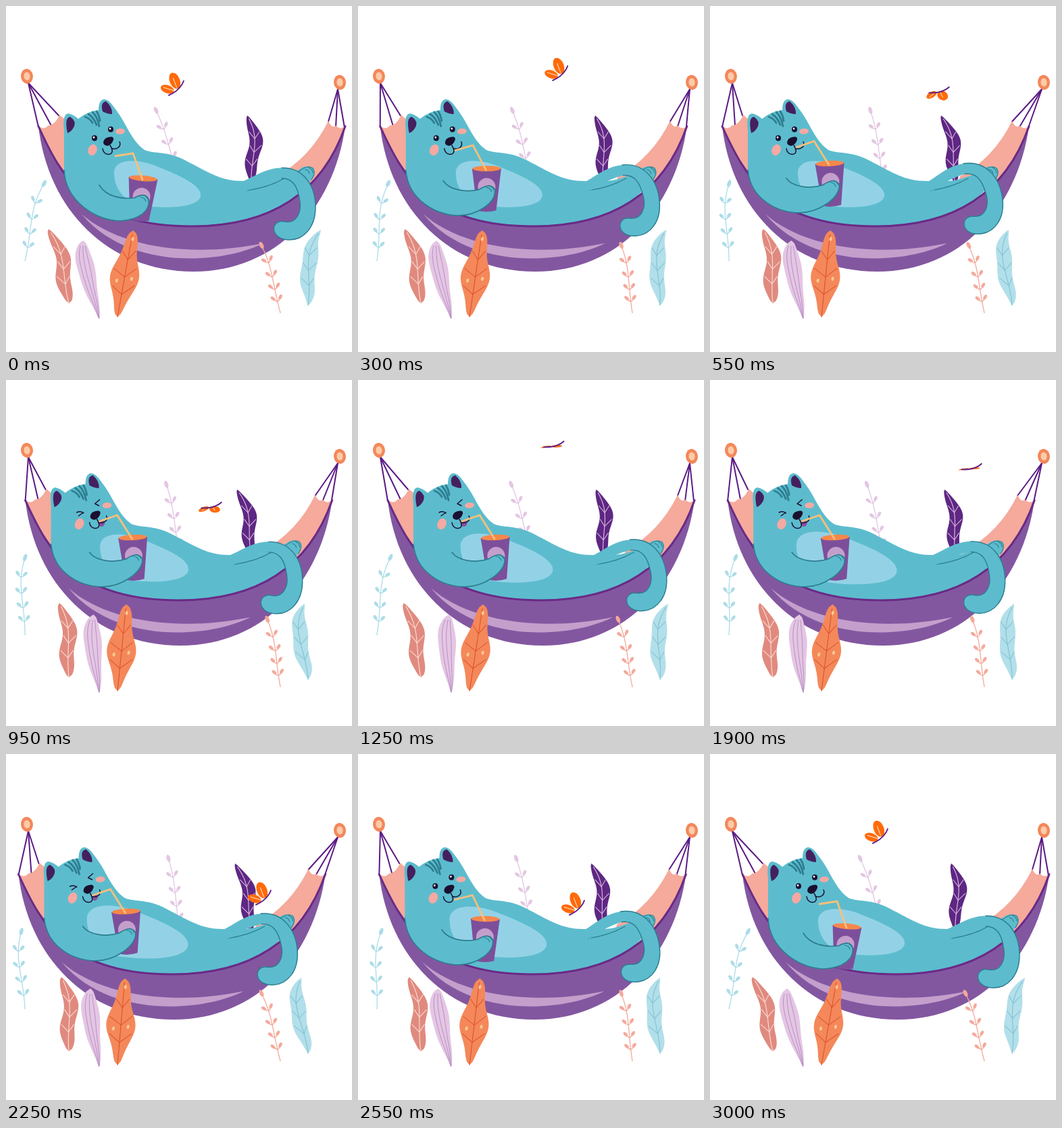
Recreate the animation shown at these times as an HTML page with a canvas. Size 512 by 512 pixels, loop 3050 ms.

```html
<!DOCTYPE html>
<html>
<head>
<meta charset="utf-8">
<style>
html, body { margin: 0; width: 100%; height: 100%; overflow: hidden; background: #fff; }
canvas { display: block; width: 512px; height: 512px; }
</style>
</head>
<body>
<canvas id="stage" width="512" height="512"></canvas>
<script>
const ctx = document.getElementById('stage').getContext('2d');
const LOOP = 3050, STEP = 50, TAU = Math.PI * 2;
const TEAL = '#5cbccd', DEEP = '#2d7d90', PURPLE = '#8357a0', PLUM = '#5b1a85',
  MAUVE = '#c49fcc', SALMON = '#f5aa9b', INK = '#1b1030', STRAW = '#f9c07a';

const mix = (a, b, k) => a + (b - a) * k;
const ease = u => (1 - Math.cos(Math.PI * Math.min(1, Math.max(0, u)))) / 2;

// Swings 0, 1, 0, 1 ... at the given times.
function swing(t, times) {
  let i = 0;
  while (i < times.length - 2 && t >= times[i + 1]) i++;
  const e = ease((t - times[i]) / (times[i + 1] - times[i]));
  return i % 2 ? 1 - e : e;
}
const every = half => Array.from({ length: 3000 / half + 1 }, (_, i) => i * half);

function shape(d, fill, stroke, width = 1.5) {
  const path = new Path2D(d);
  if (fill) { ctx.fillStyle = fill; ctx.fill(path); }
  if (stroke) { ctx.strokeStyle = stroke; ctx.lineWidth = width; ctx.stroke(path); }
}
function oval(x, y, rx, ry, fill, turn = 0) {
  ctx.beginPath();
  ctx.ellipse(x, y, rx, ry, turn, 0, TAU);
  ctx.fillStyle = fill;
  ctx.fill();
}
function group(x, y, turn, draw, sx = 1, sy = 1) {
  ctx.save();
  ctx.translate(x, y);
  ctx.rotate(turn);
  ctx.scale(sx, sy);
  draw();
  ctx.restore();
}
function line(points, color, width) {
  shape('M' + points.map(p => p.join(' ')).join('L'), null, color, width);
}

// Plants: the foot stays put, the tip moves by `sway`, `bow` curves the upper part.
const spine = (p, bend, u) => [
  mix(p.foot[0], p.tip[0] + p.sway * bend, u) + p.bow * Math.sin(Math.PI * u ** 1.7),
  mix(p.foot[1], p.tip[1], u)
];
function edge(p, bend, u, side) {
  const [x, y] = spine(p, bend, u);
  const w = p.w * Math.sin(Math.PI * u ** p.k) ** p.round * (1 + p.wavy * Math.sin(10 * u + side * p.skew + p.phase));
  return [x + side * w, y];
}
const span = (from, to, fn) => Array.from({ length: 31 }, (_, i) => fn(mix(from, to, i / 30)));

function leaf(p, bend) {
  const outline = [...span(0, 1, u => edge(p, bend, u, -1)), ...span(1, 0, u => edge(p, bend, u, 1))];
  shape('M' + outline.map(q => q.join(' ')).join('L') + 'Z', p.fill);
  if (p.grain) {
    for (const side of [-.5, 0, .5]) line(span(.02, .93, u => {
      const [x, y] = spine(p, bend, u);
      return [mix(x, edge(p, bend, u, Math.sign(side) || 1)[0], Math.abs(side)), y];
    }), p.vein, 1);
    return;
  }
  line(span(0, .95, u => spine(p, bend, u)), p.vein, 1.2);
  for (const u of [.26, .46, .66]) for (const side of [-1, 1]) {
    const [x, y] = edge(p, bend, u + .1, side), c = spine(p, bend, u);
    line([c, [mix(c[0], x, .85), y]], p.vein, 1.1);
  }
  if (p.dots) for (const [u, side] of [[.42, -.6], [.44, .6], [.9, .1]]) {
    const [x, y] = spine(p, bend, u);
    oval(x + side * p.w, y, 2, 3, p.dots, .2);
  }
}
function twig(p, bend) {
  line(span(0, 1, u => spine(p, bend, u)), p.fill, 1.3);
  for (const u of [.19, .36, .54, .74]) {
    const a = spine(p, bend, u), b = spine(p, bend, u + .02);
    group(...a, Math.atan2(b[0] - a[0], a[1] - b[1]), () => {
      for (const s of [-1, 1]) {
        shape(`M0 3Q${s * 3} 2 ${s * 5} -1`, null, p.fill, 1.4);
        oval(s * 5.6, -2.5, 2.3, 4, p.fill, s * .7);
      }
    });
  }
  const a = spine(p, bend, .96), b = spine(p, bend, 1);
  oval(...a, 2.8, 5.5, p.fill, Math.atan2(b[0] - a[0], a[1] - b[1]));
}

const leafOf = o => ({ k: 1, round: .65, wavy: .25, phase: 0, skew: 1.2, ...o });
const plumLeaf = leafOf({ foot: [363, 263], tip: [357, 162], sway: -18, bow: 9, w: 10.5, fill: '#5d2783', vein: '#d9b3dc' });
const coralLeaf = leafOf({ foot: [93, 440], tip: [63, 330], sway: 19, bow: 8, w: 11.5, k: .9, round: .55, fill: '#e08a7f', vein: '#fbd8cf' });
const lilacLeaf = leafOf({ foot: [138, 464], tip: [114, 347], sway: 22, bow: -5, w: 13, k: 1.6, round: .55, wavy: .1, fill: '#e4c6e3', vein: '#b88fc6', grain: true });
const orangeLeaf = leafOf({ foot: [165, 460], tip: [188, 332], sway: -12, bow: 0, w: 18, round: .6, wavy: .22, phase: -2.9, skew: .3, fill: '#f4885a', vein: '#de5630', dots: '#fcc793' });
const skyLeaf = leafOf({ foot: [447, 443], tip: [466, 331], sway: -29, bow: -11, w: 12, fill: '#b2dfea', vein: '#83c4d4' });
const skyTwig = { foot: [28, 377], tip: [59, 258], sway: -35, bow: -7, fill: '#acdce8' };
const lilacTwig = { foot: [257, 263], tip: [220, 150], sway: 19, bow: 3, fill: '#e3c6e2' };
const coralTwig = { foot: [406, 454], tip: [376, 350], sway: 12, bow: 4, fill: '#f5a99b' };

function ropes(x, y, ends) {
  for (const [ex, ey] of ends) line([[x, y], [ex, ey]], PLUM, 2);
}
function ring(x, y) {
  oval(x, y, 9, 11, '#f3875b', -.1);
  oval(x, y, 4.6, 6, '#fccba8', -.1);
}

function cloth() {
  shape('M48 178Q57 184 62 177Q73 176 79 161L92 172V255Q62 222 48 178Z', SALMON);
  shape('M400 252Q450 225 477 170Q482 182 488 177Q495 184 502 178Q485 235 440 270L390 285Z', SALMON);
}
function hammock() {
  const rim = 'M48 178C83 255 122 326 275 326C400 326 470 270 502 178';
  shape(rim + 'C485 300 400 393 278 393C150 393 62 300 48 178Z', PURPLE);
  shape(rim, null, '#6a2a86', 3);
  shape('M112 308C165 355 270 374 381 351C320 382 182 392 112 308Z', MAUVE);
}

function body(swell) {
  shape('M86 185Q83 160 92 159Q99 160 107 167Q120 156 137 154Q137 139 145 138Q152 138 160 150C178 172 184 198 205 213' +
    'C222 220 240 213 272 232C300 246 318 259 350 259Q372 261 392 258Q422 251 438 239Q447 235 455 240Q459 248 452 257' +
    'L425 285L390 330H190L110 300Q84 268 86 235Z', TEAL);
  shape('M432 246Q446 234 454 240Q459 247 452 257M443 242Q448 243 449 248M448 239Q454 242 454 247' +
    'M357 273Q390 268 412 255', null, DEEP, 1.2);
  group(224, 264, 0, () => shape('M-64 -17C-64 -39 -29 -39 1 -26C31 -14 66 1 64 17C61 36 6 36 -24 31C-49 26 -64 6 -64 -17Z', '#93d2e6'),
    1 + .17 * swell, 1 + .14 * swell);
}

function face(sipping) {
  shape('M91 188Q86 165 95 164Q104 170 101 178Q97 186 91 188ZM143 156Q139 143 148 141Q158 150 157 160Q150 160 143 156Z', '#45205f');
  shape('M117 164Q124 166 128 173M122 160Q130 165 134 176M128 157Q135 163 138 178M134 156Q138 162 139 170', null, DEEP, 2.8);
  oval(128, 213, 6.5, 8.5, '#f5a9a2', .4);
  oval(169, 185.5, 7, 4.2, '#f5a9a2', -.1);
  if (sipping) {
    shape('M124 196Q130 193 134 197M134 196L127 201M158 177L151 183L157 186', null, INK, 1.5);
    oval(161, 212, 4.5, 5, '#8a4fa0', .3);
  } else {
    for (const [x, y] of [[131, 195.5], [155, 182.5]]) {
      oval(x, y, 4, 4.2, INK);
      oval(x - 1, y - 1, 1.3, 1.4, '#fff');
    }
  }
  shape('M144 202Q145 195 152 194Q160 192 159 198Q156 206 150 207Q144 206 144 202Z', INK);
  shape('M143 211C144 222 159 222 157 213Q156 209 154 206M157 211C165 213 171 207 168 201', null, INK, 1.5);
}

function cup(lift) {
  const x = mix(203, 207, lift), y = mix(255, 233, lift);
  group(x, y, mix(.09, -.05, lift), () => {
    shape('M-21.5 0H21.5L14 62Q0 66 -14 62Z', '#7d4f9b');
    oval(0, 27, 13, 13, MAUVE);
    oval(0, 0, 20.8, 4.2, '#f7874a');
  });
  shape(`M${x - 1} ${y + 2}L${mix(188, 184, lift)} ${mix(218, 200, lift)}L${mix(162, 158, lift)} ${mix(222, 209, lift)}`, null, STRAW, 2.8);
}

function arm(lift) {
  const m = (a, b) => mix(a, b, lift);
  shape(`M86 243C${m(88, 90)} ${m(290, 286)} ${m(135, 130)} ${m(318, 306)} ${m(168, 162)} ${m(318, 306)}` +
    `C${m(195, 190)} ${m(317, 306)} ${m(214, 224)} ${m(304, 284)} ${m(211, 221)} ${m(286, 264)}` +
    `Q${m(207, 214)} ${m(275, 253)} ${m(190, 197)} ${m(284, 265)}` +
    `C${m(170, 178)} ${m(286, 271)} ${m(148, 152)} ${m(282, 268)} ${m(138, 143)} ${m(265, 255)}`, TEAL, DEEP, 1.7);
  const px = m(0, 9), py = m(0, -22);
  shape(`M${199 + px} ${283 + py}q6 0 8 6M${203 + px} ${280 + py}q5 1 7 6`, null, DEEP, 1.2);
}

function tail(k) {
  group(362, 258, -.145 * k, () => {
    ctx.translate(-362, -258);
    const curl = 'C440 239 458 265 458 298C458 328 440 346 420 346C388 346 392 314 412 319C430 323 437 305 435 290C432 266 424 255 408 255';
    shape('M340 263C365 256 380 240 408 239.5' + curl + 'Q385 258 357 273Z', TEAL);
    shape('M408 239.5' + curl, null, DEEP, 1.4);
  });
}

// Time, x, y along the flight.
const flight = [[0, 251, 124], [250, 290, 101], [550, 337, 126], [750, 335, 170], [950, 302, 187], [1100, 284, 125],
  [1400, 300, 80], [1600, 339, 83], [1900, 385, 130], [2250, 380, 215], [2550, 323, 230], [2700, 275, 120], [3000, 251, 124]];
function along(t, axis) {
  let i = 0;
  while (i < flight.length - 2 && t >= flight[i + 1][0]) i++;
  const slope = j => {
    const a = flight[Math.max(0, j - 1)], b = flight[Math.min(flight.length - 1, j + 1)];
    return (b[axis] - a[axis]) / (b[0] - a[0]);
  };
  const a = flight[i], b = flight[i + 1], h = b[0] - a[0], u = (t - a[0]) / h;
  return mix(a[axis], b[axis], u * u * (3 - 2 * u)) + h * u * (1 - u) * ((1 - u) * slope(i) - u * slope(i + 1));
}
function butterfly(t) {
  const up = (1 + 2 * Math.cos(TAU * t / 150)) / 3;
  const low = -.3 + .3 * Math.cos((t - 1600) / 330);
  group(along(t, 1), along(t, 2), -.1 - .49 * up, () => {
    group(0, 0, 0, () => {
      oval(-9, -7, 5.5, 9.5, '#ff6a0a', -.65);
      oval(6, -11, 7, 11.5, '#ff6a0a', .2);
      shape('M-3 -1L-12 -12M-1 -2L-3 -13M3 -2L6 -15', null, '#ffe0c4', 1);
    }, 1, mix(low, 1, up));
    shape('M-12 1Q0 3 8 0Q12 -1 16 -4', null, PLUM, 1.7);
  }, 1.08, 1.08);
}

function draw(t) {
  const sway = swing(t, [0, 600, 1450, 2150, 3000]);
  const breeze = swing(t, every(750));
  const slow = swing(t, every(1500));
  const quick = swing(t, [0, 300, 750, 1050, 1500, 1800, 2250, 2550, 3000]);
  const lift = ease(t / 500) - ease((t - 2300) / 500);
  const swell = ease((t - 600) / 1500) - ease((t - 2300) / 700);
  const dx = -30.5 * sway;

  ctx.fillStyle = '#fff';
  ctx.fillRect(0, 0, 512, 512);
  ctx.lineCap = ctx.lineJoin = 'round';

  ropes(33, 114, [[48 + dx, 179], [67 + dx, 177], [78 + dx, 162]]);
  ropes(491, 123, [[477 + dx, 171], [488 + dx, 179], [501 + dx, 180]]);
  ring(31, 104);
  ring(494, 113);

  twig(lilacTwig, breeze);
  leaf(plumLeaf, breeze);
  group(dx, 0, 0, () => {
    cloth();
    body(swell);
    hammock();
    face(t >= 700 && t < 2400);
    cup(lift);
    arm(lift);
    tail(swing(t, every(500)));
  });

  twig(skyTwig, breeze);
  leaf(coralLeaf, breeze);
  leaf(lilacLeaf, slow);
  leaf(orangeLeaf, breeze);
  twig(coralTwig, quick);
  leaf(skyLeaf, breeze);
  butterfly(t);
}

const start = performance.now();
function tick() {
  const t = (performance.now() - start) % LOOP;
  draw(Math.floor(t / STEP) * STEP);
  requestAnimationFrame(tick);
}
tick();
</script>
</body>
</html>
```
